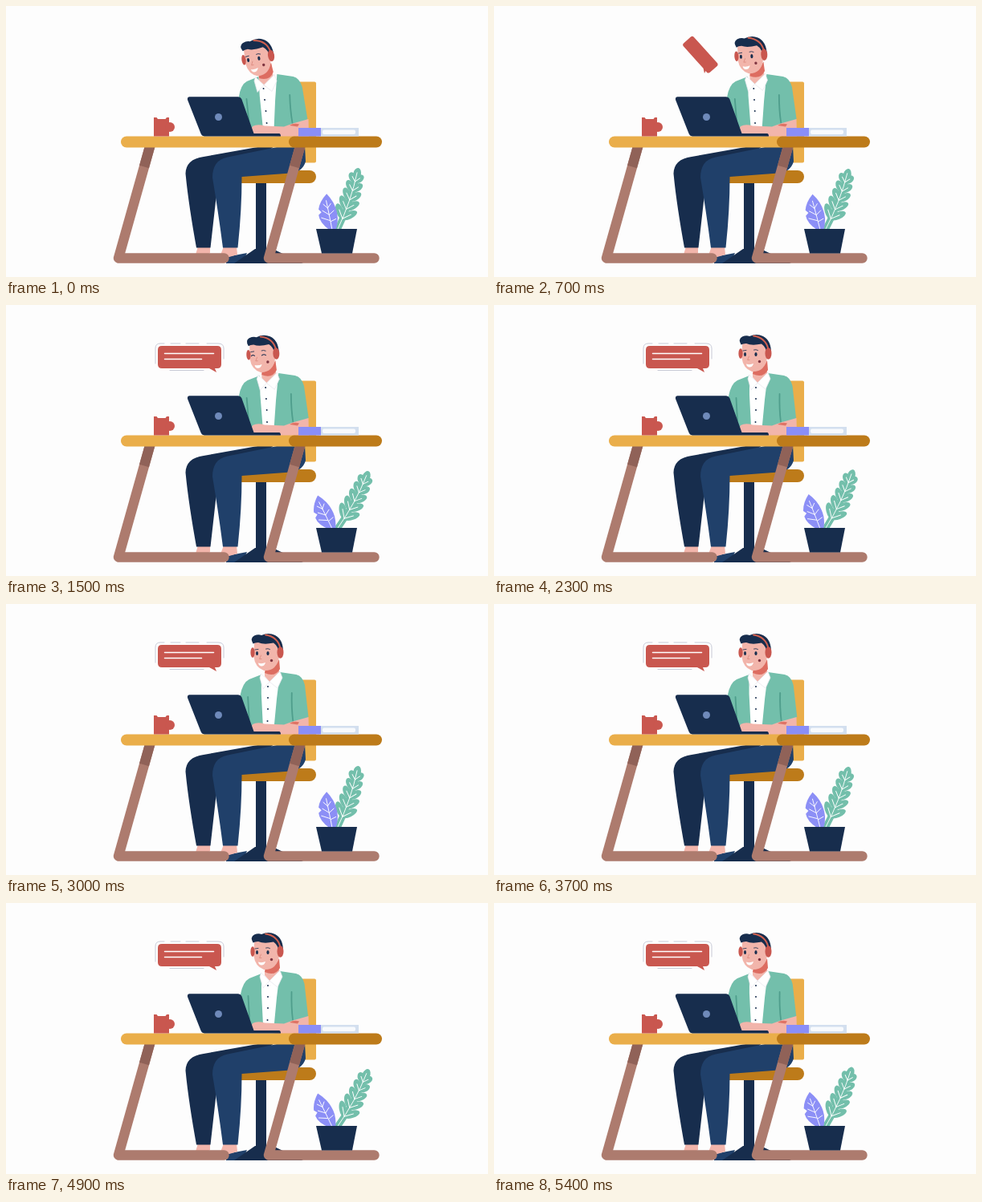
Animation of 600 by 338 pixels, one loop 5500 ms. Source, as an HTML page:

```html
<!DOCTYPE html>
<html lang="en">
<head>
<meta charset="utf-8">
<title>Working at a desk</title>
<style>
html, body { margin: 0; width: 100%; height: 100%; overflow: hidden; background: #fdfdfd; }
svg { display: block; width: 100vw; height: 100vh; }
.line { fill: none; stroke-linecap: round; stroke-linejoin: round; }
.navy { fill: #172d4d; }
.blue { fill: #20406a; }
.skin { fill: #f2b5ab; }
.green { fill: #73bfab; }
.fold { stroke: #4f9e8c; stroke-width: 1.8; }
.red { fill: #c9574f; }
.yellow { fill: #eaae4a; }
.ochre { fill: #bd7b1a; }
.leg { stroke: #ad7b6e; stroke-width: 12.4; }
.legtop { fill: none; stroke: #906258; stroke-width: 12.4; }
.vein { stroke: #fff; stroke-width: .9; }
</style>
</head>
<body>
<svg viewBox="0 0 600 338" preserveAspectRatio="none">
  <!-- chair -->
  <rect class="yellow" x="358" y="94.500" width="28" height="101" rx="2"/>
  <path class="blue" d="M274 313 L300 308 L294 321 H274Z"/>
  <path class="navy" d="M284 321 L310 303 H332 L370 321Z"/>
  <rect class="navy" x="311" y="218" width="13" height="88"/>
  <path class="ochre" d="M286 205 H378 A8 8 0 0 1 378 221 H290Z"/>

  <!-- torso -->
  <g id="shirt">
    <path fill="#fff" d="M314 90 L330 86 L346 90 L341 160 H316Z"/>
    <g class="navy">
      <circle cx="326" cy="103" r="1"/><circle cx="326" cy="117" r="1"/>
      <circle cx="326" cy="131" r="1"/><circle cx="325.500" cy="146" r="1"/>
    </g>
  </g>
  <g id="jacket">
    <path class="green" d="M318 88 L303 94 Q295 98 292 114 L299 152 H320 L318 112Z"/>
    <path class="green" d="M341 85 L361 88 Q369 90 371.500 101 L376 141 Q366 147 357 147 L355 160 H333 L337 118Z"/>
    <path class="line fold" d="M301.500 116 L303 144 M355.500 111 Q355 130 357 146"/>
  </g>

  <!-- head -->
  <g id="head">
    <path class="skin" d="M322 78 L340 70 V88 L329 98 L322 90Z"/>
    <path fill="#dd6d61" d="M340 69 Q335 82 323 82.500 L322 86 Q335 92 341 81Z"/>
    <path class="skin" d="M309 46 L308.500 66 Q310 79 321 83 Q337 84 340 66 L340 46Z"/>
    <path class="navy" d="M307.500 49.500 Q303.500 42.500 309 39.500 Q314 37.500 318 39 Q327 35 335 39 Q345 44 345 60 L339.500 62 Q339.500 53 333 48.500 Q321 51 314 48 Q310 48 307.500 49.500Z"/>
    <path class="line" stroke="#d0604f" stroke-width="1.900" d="M323 38.500 Q339 41 341.500 56"/>
    <ellipse class="red" cx="307" cy="60.500" rx="2.600" ry="6.300"/>
    <ellipse class="red" cx="341.500" cy="60.500" rx="4" ry="7.300"/>
    <circle cx="330.500" cy="70.500" r="1.700" fill="#7e3440"/>
    <g id="open" class="navy">
      <ellipse cx="312.500" cy="61.500" rx="1.500" ry="2.500"/><ellipse cx="326" cy="61.500" rx="1.600" ry="2.600"/>
    </g>
    <path id="shut" class="line" stroke="#172b4d" stroke-width="1" d="M310.500 62 Q312.500 60 314.500 62 M323.500 62 Q326 60 328.500 62"/>
    <path class="line" stroke="#172b4d" stroke-width=".8" d="M310 57 L314 56.500 M323.500 56 Q326 55 328.500 56.500"/>
    <path class="line" stroke="#dd8e82" stroke-width=".9" d="M317.500 64 L315.500 68.500 H318"/>
    <path fill="#fff" d="M314 73.500 Q318.500 75 323 73 Q321.500 78 317.500 77.500 Q314.500 77 314 73.500Z"/>
  </g>

  <g id="collar" fill="#fff" stroke="#e5e6ec" stroke-width=".7">
    <path d="M317.500 87 L328 97 L320 106 L316 92Z"/>
    <path d="M341 84 L344 92 L338 105 L328 97Z"/>
  </g>

  <!-- legs -->
  <path class="skin" d="M239 300 H254 V308 L250 310 H236Z M271 300 H287 L288 310 L278 313 H266Z"/>
  <path class="navy" d="M336 173 L310 176.500 L246 188 Q224 191 223.500 209 Q227 246 237 301.500 H254.500 L262 235Z"/>
  <path class="blue" d="M372 174 L373 194 Q369 207 354 208.500 L293.500 213 Q293.500 255 288.500 301.500 H270 Q265 262 257 214 Q257 192 276 188.500 L342 175Z"/>

  <!-- arms -->
  <path class="skin" d="M376.500 141 L377 163 H340 L309 160 Q303 156 307 150 Q313 147 322 149.500 L346 150.500 L357 146.500Z"/>
  <path fill="#df7365" d="M353 149 Q358 145.500 365 147.500 L363 150.500Z"/>

  <!-- desk -->
  <path class="line leg" d="M180 172 L140 314.500 H271.500 M367 172 L327 314.500 H458.500"/>
  <path class="legtop" d="M180 172 L172 200.500 M367 172 L359 200.500"/>
  <rect class="yellow" x="143" y="162.500" width="222" height="14" rx="7"/>
  <rect class="ochre" x="352" y="162.500" width="116" height="14" rx="7"/>
  <rect x="390" y="152" width="49" height="10.500" fill="#d3dfef"/>
  <rect x="394" y="154.500" width="41" height="5.500" rx="2" fill="#f8fafd"/>
  <rect x="364" y="152" width="28" height="10.500" fill="#8a8ef7"/>
  <path class="red" d="M184 139 H187.500 L189 141 H198.500 L200 139 H203 V162.500 H184Z"/>
  <circle class="red" cx="204" cy="151" r="6"/>

  <!-- laptop -->
  <path class="navy" d="M228.500 113.300 H289 Q292 113.300 293.300 116 L308.500 159 H340 Q342 159 342 162.500 H247 Q243.500 162 242.500 159 L226 117 Q225.500 113.300 228.500 113.300Z"/>
  <circle cx="264.500" cy="138.500" r="4.500" fill="#6f8aba"/>

  <!-- plant -->
  <g id="tall"></g>
  <g id="small">
    <path fill="#8c8ff6" d="M403 280 Q389 272 387 263 L390 259 L386 256 Q386 246 393.500 235.500 Q408 247 411 264 Q412 273 410 280Z"/>
    <path class="line vein" d="M394 244 Q399 258 406 279 M397 253 L391 249 M400 261 L391 257 M402 268 L391 266 M397 253 L400 247 M400 261 L405 255 M403 269 L409 265"/>
  </g>
  <path class="navy" d="M386 278 H437 L431 308.500 H393Z"/>

  <!-- speech bubble -->
  <g id="bubble">
    <path class="red" d="M194 51 H263 Q268 51 268 56 V74 Q268 79 263 79 H260 L262 84 L253 79 H194 Q189 79 189 74 V56 Q189 51 194 51Z"/>
    <g class="line" stroke="#fff" stroke-width="1.500">
      <path id="row1"/><path id="row2"/>
    </g>
    <path id="frame" class="line" stroke="#c2c7d4" stroke-width=".9" d="M186 73 V54 Q186 48 192 48 H197 M205 48 H217 M224 48 H240 M250 48 H264 Q271 48 271 54 V67 M204 81.500 H246"/>
  </g>
</svg>
<script>
const LOOP = 5500, STEP = 100;
const $ = id => document.getElementById(id);
const set = (id, name, value) => $(id).setAttribute(name, value);
const wave = (t, period, peak) => Math.cos((t - peak) / period * 2 * Math.PI);
const clamp = x => Math.min(1, Math.max(0, x));

// Rows: time, then values; eased or linear in between.
const POSE = [[0, -7, 3, -9], [700, -3.5, .8, -3.5], [1500, -3.7, .6, -3], [2200, 0, 0, 0]];
const POP = [[500, 0, 95], [700, .62, 48], [800, .88, 24], [900, 1.04, -3], [1000, 1, 0]];
const BLINKS = [1500, 4500];

function sample(rows, t, ease = x => x) {
  const next = rows.findIndex(r => r[0] > t);
  if (next < 0) return rows[rows.length - 1].slice(1);
  if (next === 0) return rows[0].slice(1);
  const a = rows[next - 1], b = rows[next];
  const k = ease((t - a[0]) / (b[0] - a[0]));
  return a.slice(1).map((v, i) => v + (b[i + 1] - v) * k);
}

function buildTallLeaf() {
  const at = (u, a, b, c) => (1 - u) ** 2 * a + 2 * u * (1 - u) * b + u * u * c;
  const rib = 'M412 280 Q433 244 443 210';
  let lobes = '', veins = '';
  for (let i = 0; i < 5; i++) {
    const u = .2 + i * .16;
    const x = at(u, 412, 433, 443), y = at(u, 280, 244, 210);
    const len = 19 - i * 1.8;
    for (const side of [-1, 1]) {
      const spin = `translate(${x} ${y}) rotate(${-60 - 14 * u + side * 42})`;
      lobes += `<ellipse transform="${spin}" cx="${len / 2}" rx="${len / 2 + 1}" ry="4.600"/>`;
      veins += `<path transform="${spin}" d="M0 0H${len * .62}"/>`;
    }
  }
  $('tall').innerHTML = `<g class="green">${lobes}<ellipse transform="translate(442.500 213) rotate(-73)" rx="9" ry="5"/></g>
    <path class="line" stroke="#73bfab" stroke-width="8" d="${rib}"/>
    <g class="line vein"><path d="${rib}"/>${veins}</g>`;
}

// Leans about the desk line and swells with the breath.
const bend = (lean, swell) => `translate(333 155) matrix(${swell} 0 ${lean} 1 0 0) translate(-333 -155)`;

function draw(t) {
  const [dx, dy, tilt] = sample(POSE, t, x => x * x * (3 - 2 * x));
  const swell = 1.015 + .015 * wave(t, 2600, 1150);
  const lean = -dx / 67;
  set('shirt', 'transform', bend(lean, 1));
  set('jacket', 'transform', bend(lean / 2, swell));
  set('collar', 'transform', `translate(${dx} ${dy * .5})`);
  set('head', 'transform', `translate(${dx} ${dy}) rotate(${tilt} 329 88)`);

  const shut = BLINKS.some(b => Math.abs(t - b) < 100);
  set('open', 'visibility', shut ? 'hidden' : 'visible');
  set('shut', 'visibility', shut ? 'visible' : 'hidden');

  const sway = wave(t, 3000, 1700);
  set('tall', 'transform', `rotate(${sway * 5.3} 414 279)`);
  set('small', 'transform', `rotate(${-sway * 8} 406 279)`);

  const [size, turn] = sample(POP, t);
  set('bubble', 'transform', `translate(262 84) rotate(${turn}) scale(${size}) translate(-262 -84)`);
  set('bubble', 'visibility', size > 0 ? 'visible' : 'hidden');
  const grow = clamp((t - 1000) / 400);
  set('row1', 'd', grow ? `M197.500 60.500h${61 * grow}` : '');
  set('row2', 'd', grow ? `M197.500 67.500h${46 * grow}` : '');
  set('frame', 'opacity', clamp((t - 1000) / 300));
}

buildTallLeaf();
const start = performance.now();
function tick() {
  const t = (performance.now() - start) % LOOP;
  draw(Math.floor(t / STEP) * STEP);
  requestAnimationFrame(tick);
}
tick();
</script>
</body>
</html>
```
